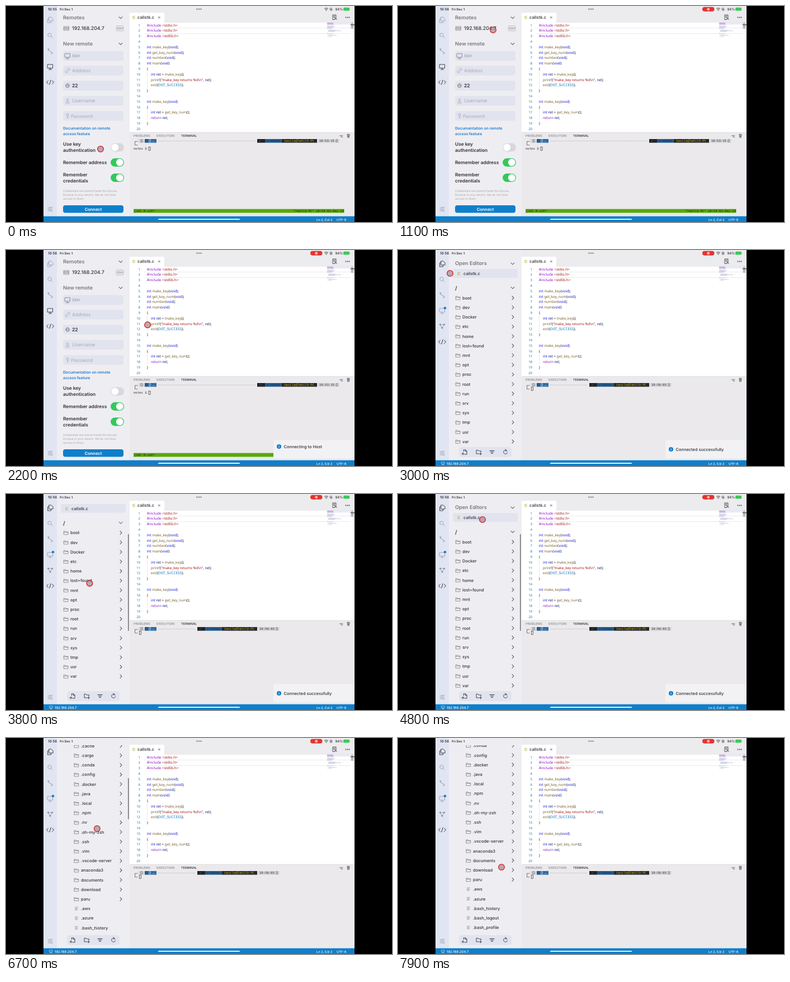
An HTML page that plays this animation: 690x388 px, repeating every 8000 ms.

```html
<!DOCTYPE html>
<html lang="en">
<head>
<meta charset="utf-8">
<title>Remote file browsing</title>
<style>
html, body { margin: 0; width: 100%; height: 100%; overflow: hidden; background: #000; }
svg { display: block; width: 100vw; height: 100vh; font-family: Inter, "Open Sans", sans-serif; }
.code { font: 6.35px "Noto Sans", sans-serif; }
.mono { font: 5.6px "DejaVu Sans Mono", monospace; }
</style>
</head>
<body>
<svg id="stage" viewBox="0 0 690 388" text-rendering="geometricPrecision"></svg>
<script>
const LOOP = 8000, STEP = 100, PITCH = 17.2;
const HOST = '192.168.204.7', USER = 'tavilo', PC = 'TaVilO-PC';
const INK = '#303036', GREY = '#77777e', PALE = '#a9aab6', BLUE = '#0f7fcb', SIDE = '#eeeef2', FIELD = '#e1e3ef';

const esc = s => s.replace(/&/g, '&amp;').replace(/</g, '&lt;').replace(/>/g, '&gt;');
const rect = (x, y, w, h, fill, r = 0, more = '') =>
  `<rect x="${x}" y="${y}" width="${w}" height="${h}" rx="${r}" fill="${fill}" ${more}/>`;
const text = (x, y, s, size, fill = INK, weight = 500, more = '') =>
  `<text x="${x}" y="${y}" font-size="${size}" font-weight="${weight}" fill="${fill}" ${more}>${esc(s)}</text>`;
const mono = (x, y, s, fill = INK) => `<text class="mono" x="${x}" y="${y}" fill="${fill}">${esc(s)}</text>`;
const line = (d, color = INK, w = 0.9, more = '') =>
  `<path d="${d}" fill="none" stroke="${color}" stroke-width="${w}" stroke-linecap="round" stroke-linejoin="round" ${more}/>`;
const dot = (x, y, r, fill, more = '') => `<circle cx="${x}" cy="${y}" r="${r}" fill="${fill}" ${more}/>`;
const group = (id, body, more = '') => `<g id="${id}" ${more}>${body}</g>`;
const at = (x, y, body) => `<g transform="translate(${x} ${y})">${body}</g>`;
const down = (x, y) => line(`M${x - 3} ${y - 1.5}l3 3 3-3`, '#75757b', 1.1);

// Icons are drawn around 0,0
const icon = {
  files: c => line('M-2-5h4l3 3v4h-7zM-2-2h-2.500v7h6v-3', c),
  search: c => line('M-4.200-1a3.200 3.200 0 1 0 6.400 0a3.200 3.200 0 1 0-6.400 0M1.500 1.500l3 3', c),
  branch: c => line('M-3-1.500v-2M-3-1.500c0 3 6 0 6 4M-4.200-3.500a1.200 1.200 0 1 0 2.400 0a1.200 1.200 0 1 0-2.400 0M1.800 3.700a1.200 1.200 0 1 0 2.400 0a1.200 1.200 0 1 0-2.400 0', c),
  monitor: c => line('M-4.500-4h9v6.500h-9zM0 2.500v2.500M-2.500 5h5', c),
  graph: c => line('M-3.500-3h7l-3.500 6z', c, 0.6) + dot(-3.5, -3, 1.4, c) + dot(3.5, -3, 1.4, c) + dot(0, 3, 1.4, c),
  code: c => line('M-3.500-3l-3 3 3 3M3.500-3l3 3-3 3M1.200-4l-2.400 8', c, 1),
  sliders: c => line('M-4-3h8M-4 0h8M-4 3h8M1.500-4v2M-1.500-1v2M2 2v2', c),
  server: c => line('M-4.500-3.500h9v2.300h-9zM-4.500-1.200h9v2.400h-9zM-4.500 1.200h9v2.300h-9z', c, 0.7),
  link: c => line('M-1.500 1.500l3-3M-.5-2.200l1.200-1.200a1.900 1.900 0 0 1 2.700 2.700l-1.200 1.200M.5 2.200l-1.200 1.200a1.900 1.900 0 0 1-2.700-2.700l1.200-1.200', c),
  globe: c => line('M-3.500 0a3.500 3.500 0 1 0 7 0a3.500 3.500 0 1 0-7 0M-3.500 0h7M0-3.500c-2.500 2-2.500 5 0 7c2.500-2 2.500-5 0-7', c, 0.7),
  person: c => line('M-1.700-1.700a1.700 1.700 0 1 0 3.400 0a1.700 1.700 0 1 0-3.400 0M-3 3.700c0-4 6-4 6 0z', c),
  key: c => line('M-2-2a2 2 0 1 0 4 0a2 2 0 1 0-4 0M0 0v4.500M0 2.500h1.500', c),
  folder: c => line('M-3.700-2.700h2.700l1 1.200h3.700v4.700h-7.400zM-3.700-.8h7.400', c, 0.75),
  page: c => line('M-2.500-2.500h5M-2.500-.8h3.500M-2.500.9h5M-2.500 2.600h3.500', c, 0.6)
};
const put = (name, x, y, c = INK) => at(x, y, icon[name](c));

const source = `#include <stdio.h>
#include <stdio.h>
#include <stdlib.h>

int make_key(void);
int get_key_num(void);
int number(void);
int main(void)
{
    int ret = make_key();
    printf("make_key returns %d\\n", ret);
    exit(EXIT_SUCCESS);
}

int make_key(void)
{
    int ret = get_key_num();
    return ret;
}
`.split('\n');
const inks = ['#8a12c8', '#1414e6', '#a31515', '#795e26', '#0070c1', '#001080'];
const syntax = /(#include|\breturn\b)|(\bint\b|\bvoid\b)|(<.*?>|"[^"]*")|(\w+)(?=\()|(EXIT_\w+)|(\bret\b)/g;

function paint(s) {
  let out = '', last = 0;
  for (const m of s.matchAll(syntax)) {
    const kind = m.slice(1).findIndex(Boolean);
    out += esc(s.slice(last, m.index)) + `<tspan fill="${inks[kind]}">${esc(m[0])}</tspan>`;
    last = m.index + m[0].length;
  }
  return out + esc(s.slice(last));
}

function editor() {
  let out = rect(221, 0, 402, 30, '#ececef') + rect(221, 12, 62, 18, '#fff') + rect(221, 30, 402, 197, '#fff') +
    text(226, 23, 'C', 7, '#b9b23c', 700) + text(235, 23, 'callstk.c', 7.6) +
    line('M272.300 19l3 3M275.300 19l-3 3', INK, 0.7) +
    line('M588 24.500h-4v-8.500h6v4M585.500 18h3M585.500 20h2M587.700 22a1.300 1.300 0 1 0 2.600 0a1.300 1.300 0 1 0-2.600 0M590 23l1.300 1.400', INK, 0.8) +
    [607.5, 610.5, 613.5].map(x => dot(x, 20.5, 0.9, INK)).join('') +
    rect(248, 39.2, 368, 0.7, '#e2e2e4') + rect(248, 49, 368, 0.7, '#e2e2e4');
  source.forEach((s, i) => {
    const y = 36.7 + i * 9.79, nested = s[0] === ' ', body = s.trim();
    out += `<text class="code" x="240" y="${y}" text-anchor="end" fill="#237893" style="font-size:6px">${i + 1}</text>`;
    out += `<text class="code" x="${nested ? 259 : 251.7}" y="${y}" fill="#222">${paint(body)}</text>`;
    if (nested) out += rect(252, y - 7, 0.5, 9.8, '#d5d5d8');
    if (body) out += rect(nested ? 576 : 574, 30 + i * 1.4, body.length * 0.62, 0.7, i < 3 ? '#a65bc0' : '#9c9cc8', 0, 'opacity=".75"');
  });
  return out + rect(574, 29.5, 42, 4, '#8080b8', 0, 'opacity=".15"') +
    rect(616.5, 30, 5, 11, '#bcbcc0') + rect(616, 33.3, 7, 1, '#222');
}

function prompt(end, clock) {
  const x = end - 146;
  return rect(237, 239, 11, 6.6, '#d5d5d8') + rect(248, 239, 21, 6.6, '#2f6ba3') +
    rect(241, 240, 3, 4.6, 'none', 0, 'stroke="#555" stroke-width=".6"') +
    rect(250, 240, 2.5, 4.6, 'none', 0, 'stroke="#142b40" stroke-width=".6"') +
    rect(256, 240, 2.5, 4.6, 'none', 0, 'stroke="#eee" stroke-width=".6"') + mono(262, 244.500, '~', '#fff') +
    line(`M272 242.500H${x - 3}`, '#777', 0.8, 'stroke-dasharray="0 2.7"') +
    rect(x, 239, 14, 6.6, '#20242a') + mono(x + 4, 244.300, '✓', '#6d8f2f') +
    rect(x + 14, 239, 30, 6.6, '#265a8c') + mono(x + 17, 244.300, '⌂ notes', '#16385a') +
    rect(x + 44, 239, 63, 6.6, '#25282a') + mono(x + 48, 244.300, USER + '@' + PC, '#c9b414') +
    rect(x + 108.5, 239, 38, 6.6, '#d5d5d8') + mono(x + 111, 244.400, clock) +
    rect(x + 141, 240, 2.5, 4.6, 'none', 0, 'stroke="#555" stroke-width=".6"');
}

function terminal() {
  const box = (x, y) => rect(x, y, 3, 6, 'none', 0, 'stroke="#333" stroke-width=".7"');
  const corner = line('M235 243.300h-4.500v6.500h4.500', '#444', 0.7);
  return rect(221, 227, 402, 151, '#ebe9ec') + rect(221, 226.7, 402, 0.6, '#cfcfd3') +
    text(228, 235.3, 'PROBLEMS', 5.5, '#85858b') + text(269, 235.3, 'EXECUTION', 5.5, '#85858b') +
    text(313, 235.3, 'TERMINAL', 5.5) + text(596, 235.5, '^C', 5.6) +
    line('M609.500 231h5M610.200 231.200l.3 5h3l.3-5M611 230.200h2M611.500 232.500v2.500M612.500 232.500v2.500', INK, 0.6) +
    group('before', prompt(595, '10:53:15') + corner + mono(228, 258.300, 'notes $') + box(255, 253.3) +
      rect(228, 364.7, 376.5, 6.8, '#58a80c') + mono(229, 370, '[14] 0:zsh*', '#173004') +
      mono(513.5, 370, `"${PC}" 10:54 01-Dec-23`, '#173004')) +
    group('after', prompt(488, '10:56:03') + corner + box(238.5, 246.3));
}

function toggle(y, on) {
  return rect(187, y, 24, 15, on ? '#34c95c' : '#d8d8dc', 7.5) + dot(on ? 203.3 : 194.7, y + 7.5, 6.5, '#fff');
}

function remotes() {
  const fields = [['monitor', 'SSH', 6.6, 81], ['link', 'Address', 8.5, 107.3], ['globe', '22', 8.6, 134.3],
    ['person', 'Username', 8.5, 161.500], ['key', 'Password', 8.4, 188.7]];
  return text(102, 24, 'Remotes', 9.1, GREY, 600) + down(205, 21) +
    put('server', 108, 40.3, GREY) + text(118, 43.3, HOST, 8.8, INK, 500) +
    rect(197, 35.7, 13, 9, 'none', 2, 'stroke="#999" stroke-width=".6"') + text(203.5, 42.2, 'SSH', 5.2, GREY, 500, 'text-anchor="middle"') +
    text(102, 71, 'New remote', 9.1, GREY, 600) + down(205, 68) +
    fields.map(([ic, s, size, y], i) => {
      const c = i === 2 ? INK : i ? PALE : '#85858d';
      return rect(102, y, 108, 17.5, FIELD, 4) + put(ic, 110, y + 8.7, i === 2 ? GREY : c) +
        text(i === 4 ? 116 : 118, y + 8.8 + size * 0.36, s, size, c, i === 2 ? 600 : 400);
    }).join('') +
    text(102, 222.2, 'Documentation on remote', 6.75, '#1878cf', 600) + text(102, 231.5, 'access feature', 6.75, '#1878cf', 600) +
    text(102, 251, 'Use key', 8.35, INK, 600) + text(102, 262, 'authentication', 8.35, INK, 600) + toggle(246.5, false) +
    text(102, 284, 'Remember address', 8.35, INK, 600) + toggle(273.5, true) +
    text(102, 306, 'Remember', 8.35, INK, 600) + text(102, 317, 'credentials', 8.35, INK, 600) + toggle(301, true) +
    ['Credentials are stored inside the Secure', 'Enclave in your device. We do not have', 'access to them.']
      .map((s, i) => text(102, 334 + i * 6.8, s, 5.1, '#a3a3a9', 400)).join('') +
    rect(102, 358, 108, 13.5, BLUE, 4) + text(156, 367.5, 'Connect', 7.5, '#fff', 600, 'text-anchor="middle"');
}

const words = s => s.split(' ');
const rows = [];
const add = (level, names, file) => names.forEach(name => rows.push({ level, name, file }));
add(0, words('boot dev Docker etc home'));
add(1, [USER]);
add(2, words('.cache .cargo .conda .config .docker .java .local .npm .nv .oh-my-zsh .ssh .vim .vscode-server anaconda3 documents download paru'));
add(2, words('.aws .azure .bash_history .bash_logout .bash_profile .bashrc .profile .zshrc'), true);
add(0, words('lost+found mnt opt proc root run srv sys tmp usr var'));

function explorer() {
  const tree = rows.map((r, i) => {
    const x = [107.3, 118, 126][r.level];
    const arrow = r.file ? '' : line('M-1.500-3l3 3-3 3', '#606066', 1.1, `id="arrow${i}"`);
    return group('row' + i, put(r.file ? 'page' : 'folder', x, 0, GREY) +
      text([115, 124.5, 134][r.level], 2.7, r.name, 7.5) + at(205.5, 0, arrow));
  }).join('');
  return `<g clip-path="url(#list)">` + group('scroll',
    text(102, 27.3, 'Open Editors', 9.1, GREY, 600) + down(205, 24.5) +
    rect(98, 34, 116, 16, FIELD, 3) + text(106, 45, 'C', 7, '#b9b23c', 700) + text(117, 44.8, 'callstk.c', 7.5) +
    text(102, 72, '/', 9.5, INK, 600) + down(205, 68) + tree) + '</g>' +
    rect(109, 354, 94, 18, FIELD, 5) +
    at(119, 363, line('M-1.500-4h3l2.500 2.500v5.500h-4M1.500-4v2.500h2.500M-3 1v4M-5 3h4M-1.500-4v3', INK, 0.9)) +
    at(144.5, 363, line('M0 3h-4.500v-6.500h3l1.200 1.500h4.300v2M3 1v4M1 3h4', INK, 0.9)) +
    at(168, 363, line('M-4-2.500h8M-2.700 0h5.400M-1.300 2.500h2.600', INK, 1)) +
    at(192, 363, line('M3.300-1.500a3.500 3.500 0 1 0 .2 2.500M0-5l2 1.700-2 1.700', INK, 0.9)) +
    rect(218, 72, 1.6, 174, '#77777b', 0.8, 'id="bar"');
}

function chrome() {
  const idle = '#98a0b8';
  const rail = (remote) => put('files', 79, 25, remote ? idle : INK) + put('search', 79, 53, idle) + put('branch', 79, 81, idle) +
    put('monitor', 79, 109, remote ? INK : idle);
  return rect(67, 0, 24, 378, '#e1e5f2') + rect(91, 0, 130, 378, SIDE) +
    group('railA', rail(true)) + group('railB', rail(false)) +
    group('linked', dot(84, 104.3, 2.2, BLUE) + put('graph', 79, 137, '#7c849c')) +
    group('codeIcon', icon.code(INK)) + put('sliders', 79, 365, idle);
}

function statusBars() {
  return text(75, 8, '10:55', 6.1, INK, 600, 'id="clock"') + text(96, 8, 'Fri Dec 1', 5.7, INK, 600) +
    [341.5, 345, 348.5].map(x => dot(x, 5.7, 1.1, '#67676b')).join('') +
    group('pill', rect(544, 1.8, 21.5, 8, '#e5332d', 4) + dot(554.7, 5.8, 2.2, 'none', 'stroke="#fff" stroke-width=".6"') + dot(554.7, 5.8, 1.3, '#fff')) +
    line('M569.500 4.800c2-1.700 4-1.700 6 0M570.800 6.300c1.200-1 2.200-1 3.400 0', INK, 0.9) + dot(572.5, 7.7, 0.8, INK) +
    line('M578.500 5.500a2.500 2.500 0 0 1 4.500-1M583.500 6a2.500 2.500 0 0 1-4.500 1.200', INK, 0.7) + rect(580, 5, 2, 1.8, INK, 0.4) +
    text(588.5, 8, '94%', 6.1, INK, 500) + rect(603, 2.8, 11, 5.8, '#3fc75a', 1.7) + rect(614.6, 4.7, 0.8, 2, '#9a9a9e', 0.4) +
    rect(67, 377.7, 556, 10.3, BLUE) + text(555, 385.5, 'Ln 2, Col 2', 5.6, '#fff') + text(591, 385.5, 'UTF-8', 5.6, '#fff') +
    group('host', at(80.5, 383, `<g transform="scale(.55)">${icon.monitor('#fff')}</g>`) + text(87, 385.5, HOST, 6, '#fff')) +
    rect(272, 382.2, 146, 1.9, '#fff', 0.9, 'id="homeBar"');
}

const stage = document.getElementById('stage');
stage.innerHTML = '<defs><clipPath id="list"><rect x="91" y="13" width="130" height="340"/></clipPath></defs>' +
  rect(0, 0, 690, 388, '#000') + chrome() + group('remotes', remotes()) + group('explorer', explorer()) +
  editor() + terminal() +
  group('toast', rect(478, 341.5, 142, 33, '#f2f1f4', 2) + group('message', dot(488, 0, 4, BLUE) +
    rect(487.5, -0.7, 1, 2.8, '#fff') + dot(488, -2, 0.6, '#fff') + text(496.5, 2.7, '', 7.45, INK, 500, 'id="label"'))) +
  group('face', rect(304, 153, 82, 82, '#dfdee2', 6) + dot(345, 182.5, 18, '#adc8ef') +
    text(345, 216.5, 'Brow ID', 8.8, '#151518', 700, 'text-anchor="middle"')) +
  statusBars() + dot(0, 0, 5.3, '#a88c92', 'id="pointer" fill-opacity=".72" stroke="#d2303c" stroke-width="1.5"');

const $ = {};
stage.querySelectorAll('[id]').forEach(e => { $[e.id] = e; });
const show = (e, on) => e.setAttribute('display', on ? 'inline' : 'none');
const move = (e, x, y) => e.setAttribute('transform', `translate(${x} ${y})`);
const ramp = (t, a, b) => Math.min(1, Math.max(0, (t - a) / (b - a)));
const smooth = u => u * u * (3 - 2 * u);

const pointerPath = [[0, 169, 257], [200, 169, 257], [900, 170, 43], [1100, 170, 43], [1400, 267, 143], [2100, 267, 143],
  [2700, 79, 27], [2800, 79, 27], [3000, 93, 42], [3600, 148, 190], [3900, 150, 150], [4300, 150, 185], [4400, 150, 185],
  [4800, 151, 46], [5100, 150, 153], [5300, 150, 108], [5500, 151, 118], [5600, 151, 118], [5800, 152, 124], [6100, 154, 226],
  [6500, 160, 148], [7000, 168, 190], [7400, 174.5, 219.5], [7500, 169, 214.5], [7600, 169, 214.5], [7900, 185, 232]];
const scrollPath = [[0, 0], [3600, 0], [3900, 22], [4300, 0], [5100, 0], [5300, 52], [5800, 52], [6050, 86], [6100, 86], [6500, 170], [7400, 210]];

function sample(keys, t) {
  let i = 0;
  while (i < keys.length - 1 && keys[i + 1][0] <= t) i++;
  const a = keys[i], b = keys[i + 1] || a;
  const u = a === b ? 0 : smooth(ramp(t, a[0], b[0]));
  return a.slice(1).map((v, k) => v + (b[k + 1] - v) * u);
}

function update(t) {
  const recording = t >= 500, connected = t >= 2400, browsing = t >= 2800;
  const face = t >= 1300 && t < 2000, homeOpen = t >= 5100, userOpen = t >= 5700;
  $.clock.textContent = recording ? '10:56' : '10:55';
  show($.pill, recording);
  show($.before, !connected);
  show($.after, connected);
  show($.host, connected);
  show($.linked, connected);
  show($.remotes, !browsing);
  show($.railA, !browsing);
  show($.explorer, browsing);
  show($.railB, browsing);
  move($.codeIcon, 79, connected ? 165 : 137);

  show($.face, face);
  $.homeBar.setAttribute('fill', face ? '#161a20' : '#fff');
  show($.toast, t >= 1300 && t < 6000);
  $.toast.setAttribute('opacity', 1 - ramp(t, 5700, 6000));
  $.label.textContent = connected ? 'Connected successfully' : 'Connecting to Host';
  move($.message, 0, connected ? 358 : 353);

  let y = 86;
  rows.forEach((r, i) => {
    const open = r.level === 0 || (r.level === 1 ? homeOpen : userOpen);
    show($['row' + i], open);
    if (!open) return;
    move($['row' + i], 0, y);
    y += PITCH;
    const turned = (r.name === 'home' && homeOpen) || (r.name === USER && userOpen);
    if (!r.file) $['arrow' + i].setAttribute('transform', `rotate(${turned ? 90 : 0})`);
  });
  move($.scroll, 0, -sample(scrollPath, t)[0]);
  show($.bar, t >= 3700 && t < 7400);
  $.bar.setAttribute('height', userOpen ? 74 : 174);
  move($.pointer, ...sample(pointerPath, t));
}

function tick() {
  update(Math.floor(performance.now() % LOOP / STEP) * STEP);
  requestAnimationFrame(tick);
}
tick();
</script>
</body>
</html>
```
